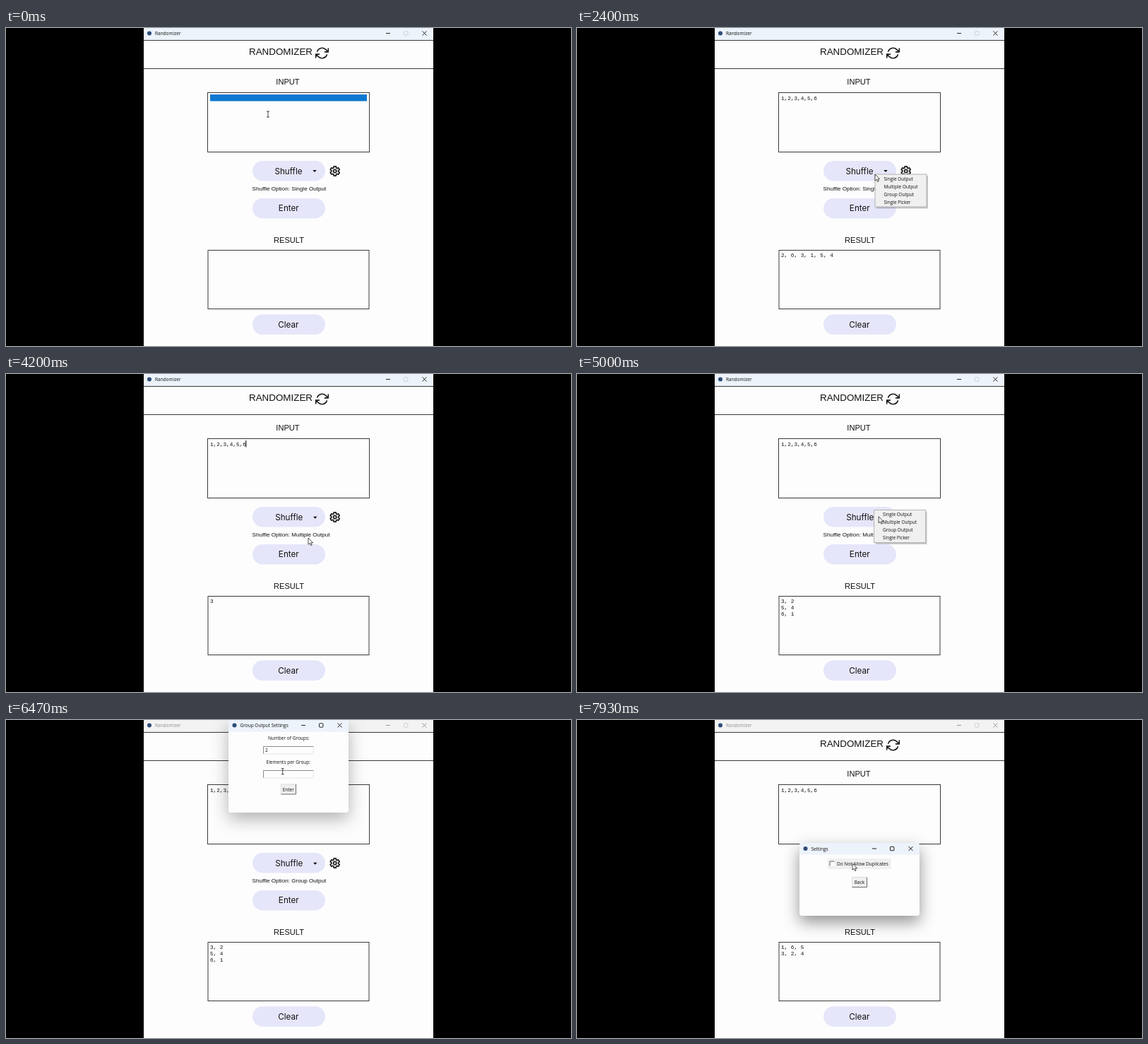
These frames come from a looping animation (800x450 px, 8 s). An HTML page:

```html
<!DOCTYPE html>
<html lang="en">
<head>
<meta charset="utf-8">
<title>Randomizer</title>
<style>
  html, body { margin: 0; width: 100%; height: 100%; overflow: hidden; background: #000; }
  svg { display: block; width: 800px; height: 450px; }
  text { fill: #111; white-space: pre; }
  .head { font-family: "Liberation Sans", Arial, sans-serif; text-anchor: middle; }
  .opt { font: 8.1px "Liberation Sans", Arial, sans-serif; }
  .mono text, .mono { font: 7.7px "Liberation Mono", monospace; }
  .ui text { font: 6.5px "Open Sans", sans-serif; }
  .mid { text-anchor: middle; }
  .pill rect { fill: #e6e6fa; }
  .pill text { font: 11.7px Inter, sans-serif; text-anchor: middle; }
  .line { fill: none; stroke: #3a3a3a; }
  .icon { fill: none; stroke: #1c1c1c; stroke-linejoin: round; stroke-linecap: round; }
  .bar { --bar: #edf3fa; color: #111; }
  .idle { --bar: #f3f3f3; color: #8c8c8c; }
  .main { --max: #c9ced4; }
  .fill { fill: var(--bar); }
  .title { fill: currentColor; }
  .ctl { fill: none; stroke: currentColor; stroke-width: .9; }
  .max { stroke: var(--max, currentColor); }
  .shadow { fill: #fdfdfe; filter: drop-shadow(0 9px 11px rgba(0, 0, 0, .42)); }
  .soft { filter: drop-shadow(0 9px 12px rgba(0, 0, 0, .3)); }
  .logo { fill: #2f4d78; }
  [data-on] { visibility: hidden; }
  [data-on].on { visibility: visible; }
</style>
</head>
<body>
<svg viewBox="0 0 800 450">
  <defs>
    <g id="ctl" class="ctl">
      <path d="M-3 0H3M48.5-3l6 6m0-6l-6 6"/>
      <rect class="max" x="22.5" y="-2.7" width="5.4" height="5.4" rx=".8"/>
    </g>
    <g id="mainBar" class="ui">
      <rect class="fill" x="195" width="410" height="17"/>
      <circle class="logo" cx="203" cy="7.5" r="3"/>
      <text class="title" x="211" y="10">Randomizer</text>
      <use href="#ctl" x="541" y="7.5"/>
    </g>
    <g id="groupBar" class="ui">
      <rect class="fill" x="315" width="170" height="16.5"/>
      <circle class="logo" cx="323.5" cy="7.5" r="3"/>
      <text class="title" x="331.5" y="10">Group Output Settings</text>
      <use href="#ctl" x="421" y="7.5"/>
    </g>
    <g id="entry">
      <path d="M0 10.5V0H71" fill="none" stroke="#8d8d8d"/>
      <path d="M71 0V10.5H0" fill="none" stroke="#e6e6e6"/>
    </g>
    <g id="tkButton">
      <rect width="21" height="14" fill="#f0f0f0"/>
      <path d="M0 14V0H21" fill="none" stroke="#dcdcdc"/>
      <path d="M0 14H21V0" fill="none" stroke="#6a6a6a"/>
    </g>
  </defs>

  <rect x="195" width="410" height="450" fill="#fdfdfe"/>
  <use href="#mainBar" class="bar main"/>
  <use href="#mainBar" class="bar main idle" data-on="6200-6800 7600-8000"/>
  <path class="line" d="M195 17.5H605M195 57.5H605"/>

  <g class="head">
    <text x="389" y="38.3" font-size="13.4">RANDOMIZER</text>
    <text x="399" y="80" font-size="11.1">INPUT</text>
    <text x="400.5" y="304.2" font-size="11.1">RESULT</text>
  </g>
  <g class="icon" transform="translate(437.9 25.9) scale(.8)" stroke-width="2">
    <path d="M23 4v6h-6M1 20v-6h6M3.5 9A9 9 0 0 1 18.4 5.6L23 10M1 14l4.6 4.4A9 9 0 0 0 20.5 15"/>
  </g>
  <rect class="line" x="285.5" y="91.5" width="229" height="84"/>
  <rect class="line" x="286" y="314.5" width="228" height="83"/>

  <rect x="289" y="94" width="222" height="9.5" fill="#0b78d0" data-on="0-200"/>
  <text class="mono" x="289" y="101.6">1,2,3,4,5,6</text>
  <g id="cover">
    <rect x="288.5" y="94" width="60" height="10" fill="#fdfdfe" data-on="200-1630"/>
    <path d="M289 94v9.5" stroke="#000"
      data-on="300-900 1200-1800 2100-2270 3000-3400 4000-4500 4800-4870"/>
  </g>

  <g class="pill">
    <rect x="349" y="188" width="103" height="28.5" rx="14.2"/>
    <rect x="349" y="241" width="103" height="28.5" rx="14.2"/>
    <rect x="349" y="405.3" width="103" height="28.5" rx="14.2"/>
    <g id="shuffle">
      <text x="400" y="206.5">Shuffle</text>
      <path d="M434.3 201h5.4l-2.7 3z"/>
    </g>
    <text x="400.3" y="259.2">Enter</text>
    <text x="399.8" y="423.6">Clear</text>
  </g>
  <g class="icon" transform="translate(465.7 202.5)" stroke-width="1.7">
    <path id="gear"/>
    <circle r="2.1"/>
  </g>

  <g class="opt">
    <text x="348.5" y="229.6" data-on="0-2700">Shuffle Option: Single Output</text>
    <text x="348.5" y="229.6" data-on="2700-4000">Shuffle Option: Single Picker</text>
    <text x="348.5" y="229.6" data-on="4000-5270">Shuffle Option: Multiple Output</text>
    <text x="348.5" y="229.6" data-on="5270-8000">Shuffle Option: Group Output</text>
  </g>

  <g class="mono">
    <text x="289" y="323.6" data-on="1900-3030">2, 6, 3, 1, 5, 4</text>
    <text x="289" y="323.6" data-on="3030-4470">3</text>
    <g data-on="4470-6800">
      <text x="289" y="323.6">3, 2</text>
      <text x="289" y="332.8">5, 4</text>
      <text x="289" y="342">6, 1</text>
    </g>
    <g data-on="6800-8000">
      <text x="289" y="323.6">1, 6, 5</text>
      <text x="289" y="332.8">3, 2, 4</text>
    </g>
  </g>

  <g id="menu" class="ui" data-on="2270-2700 3400-4000 4870-5270">
    <rect x="2.5" y="2.5" width="73" height="46.5" fill="#000" opacity=".22"/>
    <rect x=".5" y=".5" width="73" height="46" fill="#f0f0f0" stroke="#b4b4b4"/>
    <text x="13" y="9">Single Output</text>
    <text x="13" y="20">Multiple Output</text>
    <text x="13" y="31">Group Output</text>
    <text x="13" y="42">Single Picker</text>
  </g>

  <g class="ui" data-on="5330-6800">
    <path class="shadow soft" d="M315 0H485V127q0 4-4 4H319q-4 0-4-4z"/>
    <use href="#groupBar" class="bar idle"/>
    <use href="#groupBar" class="bar" data-on="6200-6800"/>
    <text class="mid" x="400.3" y="28">Number of Groups:</text>
    <use href="#entry" x="364.5" y="37.5"/>
    <text x="367" y="45" data-on="6270-6800">2</text>
    <text class="mid" x="399.8" y="62.3">Elements per Group:</text>
    <use href="#entry" x="364.5" y="71.5"/>
    <text x="367" y="79" data-on="6600-6800">3</text>
    <use href="#tkButton" x="389.5" y="91"/>
    <text class="mid" x="399.8" y="100.6">Enter</text>
  </g>

  <g class="ui" data-on="7600-8000">
    <rect class="shadow" x="315" y="174" width="170" height="103" rx="4"/>
    <path class="bar fill" d="M315 190.5V178q0-4 4-4H481q4 0 4 4v12.5z"/>
    <circle class="logo" cx="323.5" cy="182" r="3"/>
    <text x="331.5" y="184.5">Settings</text>
    <use href="#ctl" x="421" y="182"/>
    <rect x="355" y="196" width="90" height="15" fill="#f0f0f0"/>
    <rect x="358" y="200" width="6.5" height="6.5" fill="#fff"/>
    <path d="M358 206.5V200h6.5" fill="none" stroke="#666"/>
    <text x="368" y="206.4">Do Not Allow Duplicates</text>
    <use href="#tkButton" x="389.5" y="222.5"/>
    <text class="mid" x="400" y="232">Back</text>
  </g>

  <g id="pointer">
    <path id="arrow" d="M0 0V9.2L2.2 7.3L3.7 10.6L5.2 9.9L3.8 6.8H6.6z" fill="#fff" stroke="#222" stroke-width=".8"/>
    <path id="beam" d="M-2-4H2M-2 4H2M0-4V4" fill="none" stroke="#333" stroke-width=".9"/>
  </g>
</svg>
<script>
  const LOOP = 8000;
  const $ = id => document.getElementById(id);
  const clamp = v => Math.max(0, Math.min(1, v));
  const move = (el, x, y) => el.setAttribute("transform", `translate(${x} ${y})`);

  // Pointer stops: time, x, y
  const path = [
    [0, 371, 122], [1650, 372, 122], [1880, 405, 255], [1950, 405, 255],
    [2230, 422, 207], [2450, 422, 207], [2650, 445, 246], [2750, 445, 246],
    [3000, 410, 256], [3130, 410, 256], [3350, 415, 207], [3450, 415, 207],
    [3650, 430, 224], [4100, 430, 224], [4200, 428, 232], [4400, 412, 256],
    [4550, 412, 256], [4800, 420, 192], [4900, 420, 192], [5150, 440, 219],
    [5475, 440, 219], [5600, 414, 66], [5730, 414, 66], [5930, 389, 43],
    [6350, 389, 43], [6500, 392, 76], [6630, 392, 76], [6750, 400, 98],
    [6870, 400, 98], [7130, 403, 183], [7400, 466, 203], [7600, 466, 203],
    [7900, 390, 203], [8000, 390, 203]
  ];
  const menuSpots = [[0, 421.5, 206.5], [3000, 415, 207], [4500, 420, 192]];

  // Text areas that turn the pointer into a beam: from, to, left, top, right, bottom
  const fields = [
    [0, 5330, 286, 92, 514, 176], [6800, 8000, 286, 92, 514, 176],
    [5330, 6800, 364, 37, 435, 48], [5330, 6800, 364, 71, 435, 82]
  ];

  const timed = [...document.querySelectorAll("[data-on]")].map(el => ({
    el, spans: el.dataset.on.split(" ").map(s => s.split("-").map(Number))
  }));

  const gearPoints = Array.from({ length: 24 }, (_, i) => {
    const r = i % 4 < 2 ? 6.8 : 4.9;
    const a = (Math.floor(i / 4) * 60 + [-13, 13, 23, 37][i % 4] - 90) * Math.PI / 180;
    return `${(r * Math.cos(a)).toFixed(2)} ${(r * Math.sin(a)).toFixed(2)}`;
  });
  $("gear").setAttribute("d", `M${gearPoints.join("L")}z`);

  function pointerAt(t) {
    const i = path.findIndex(p => p[0] > t);
    const [t0, x0, y0] = path[i - 1], [t1, x1, y1] = path[i];
    const u = (t - t0) / (t1 - t0), k = u * u * (3 - 2 * u);
    return [x0 + (x1 - x0) * k, y0 + (y1 - y0) * k];
  }

  function draw(t) {
    // A child may only show while its own parent window is open.
    for (const { el, spans } of timed) {
      const parent = el.parentNode.closest("[data-on]");
      const open = !parent || parent.classList.contains("on");
      el.classList.toggle("on", open && spans.some(([a, b]) => t >= a && t < b));
    }
    const typed = Math.floor(11 * clamp((t - 420) / 1210));
    move($("cover"), typed * 4.62, 0);
    if (t < 200) $("cover").previousElementSibling.style.display = "none";
    else $("cover").previousElementSibling.style.display = "";

    const shift = t >= 2700 ? .8 : 0;
    move($("shuffle"), shift, shift);

    const spot = menuSpots.filter(m => t >= m[0]).pop();
    move($("menu"), spot[1], spot[2]);

    const [x, y] = pointerAt(t);
    move($("pointer"), x, y);
    const beam = fields.some(([a, b, l, top, r, bottom]) =>
      t >= a && t < b && x > l && x < r && y > top && y < bottom);
    $("beam").style.display = beam ? "" : "none";
    $("arrow").style.display = beam ? "none" : "";
  }

  const start = performance.now();
  function tick() {
    draw((performance.now() - start) % LOOP);
    requestAnimationFrame(tick);
  }
  tick();
</script>
</body>
</html>
```
